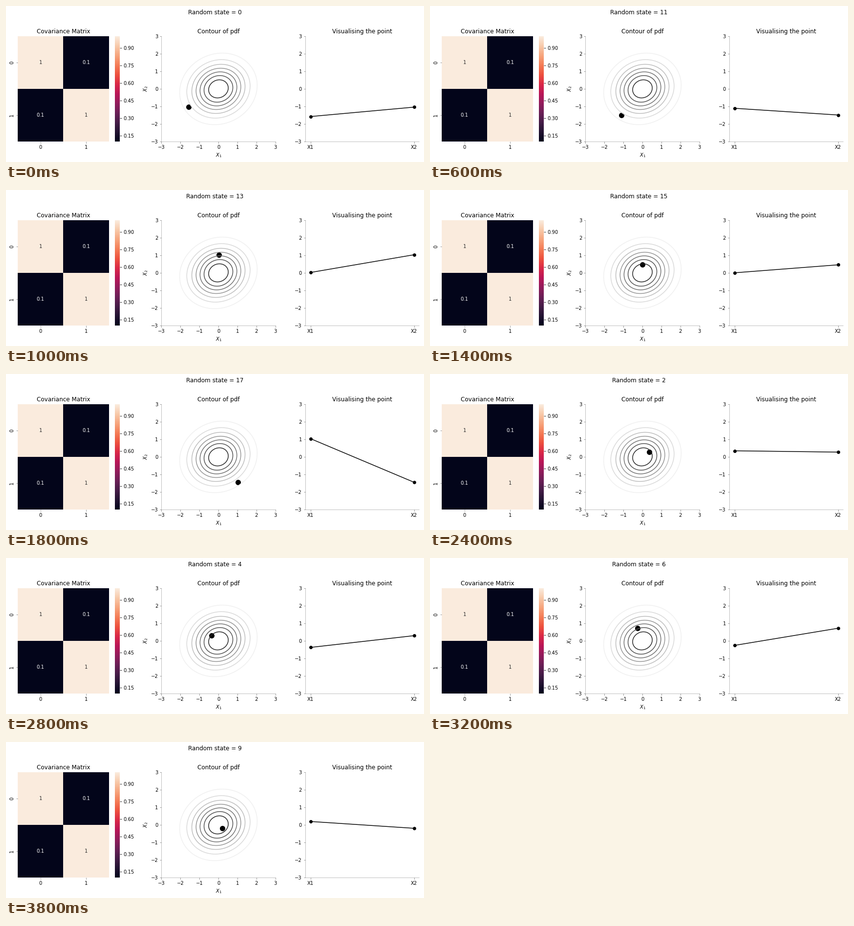
Animation of 856 by 320 pixels, one loop 4 s. Source, as a matplotlib script:

```python
import numpy as np
import matplotlib.pyplot as plt
from matplotlib.animation import FuncAnimation
from matplotlib.colors import LinearSegmentedColormap

W, H, DPI = 856, 320, 72
TOP, HEIGHT = 62, 216
GRAY = "gray"
RHO = 0.1

plt.rcParams.update({"font.family": "DejaVu Sans", "font.size": 10})

rocket = LinearSegmentedColormap.from_list("rocket", [
    "#03051A", "#221331", "#451C47", "#6A1F56", "#921C5B", "#B91657",
    "#D92847", "#ED513E", "#F47C56", "#F6A47C", "#F7C9AA", "#FAEBDD"])

# Random states run in alphabetical order: 0, 1, 10, 11, ..., 19, 2, ..., 9
states = sorted(range(20), key=str)


def sample(seed):
    """One draw from the bivariate normal with correlation RHO."""
    a, b = np.random.RandomState(seed).randn(2) * np.sqrt([1 + RHO, 1 - RHO])
    return np.array([-a - b, -a + b]) / np.sqrt(2)


fig = plt.figure(figsize=(W / DPI, H / DPI), dpi=DPI, facecolor="white")


def add_axes(left, width):
    return fig.add_axes([left / W, 1 - (TOP + HEIGHT) / H, width / W, HEIGHT / H])


def style(ax, spines=True):
    for side, spine in ax.spines.items():
        spine.set_visible(spines and side in ("left", "bottom"))
        spine.set_color(GRAY)
        spine.set_linewidth(0.5)
    ax.tick_params(direction="out", color=GRAY)


# Covariance heatmap
ax = add_axes(23.9, 187)
cov = np.array([[1, RHO], [RHO, 1]])
mesh = ax.pcolormesh(cov, cmap=rocket, vmin=RHO, vmax=1)
ax.set_ylim(2, 0)
ax.set_xticks([0.5, 1.5], ["0", "1"])
ax.set_yticks([0.5, 1.5], ["0", "1"], rotation=90, va="center")
ax.set_title("Covariance Matrix")
for (row, col), value in np.ndenumerate(cov):
    ax.text(col + 0.5, row + 0.5, f"{value:g}", ha="center", va="center",
            color="0.15" if value > 0.5 else "white")
style(ax, spines=False)

bar = fig.colorbar(mesh, cax=add_axes(222.6, 10.8), format="%.2f",
                   ticks=np.arange(0.15, 1, 0.15))
bar.outline.set_visible(False)

# Density contours
ax = add_axes(318.3, 233.5)
x, y = np.mgrid[-3:3:121j, -3:3:121j]
det = 1 - RHO ** 2
pdf = np.exp(-(x * x - 2 * RHO * x * y + y * y) / (2 * det)) / (2 * np.pi * np.sqrt(det))
ax.contour(x, y, pdf, levels=np.arange(1, 8) * 0.02, cmap="Greys", vmin=0, vmax=0.16)
dot = ax.scatter([0], [0], s=100, color="black")
ax.set(xlim=(-3, 3), ylim=(-3, 3), xticks=range(-3, 4), yticks=range(-3, 4),
       xlabel="$X_1$", ylabel="$X_2$", title="Contour of pdf")
style(ax)

# The two coordinates side by side
ax = add_axes(612.9, 233.5)
line, = ax.plot([0, 1], [0, 0], "o-", color="black")
ax.set(xlim=(-0.05, 1.05), ylim=(-3, 3), yticks=range(-3, 4),
       title="Visualising the point")
ax.set_xticks([0, 1], ["X1", "X2"])
style(ax)

heading = fig.text(0.5, 1 - 17 / H, "", ha="center", va="baseline", fontsize=12)


def update(i):
    point = sample(states[i])
    dot.set_offsets([point])
    line.set_ydata(point)
    heading.set_text(f"Random state = {states[i]}")
    return dot, line, heading


anim = FuncAnimation(fig, update, frames=len(states), interval=200,
                     repeat=True, repeat_delay=0)
plt.show()
```
